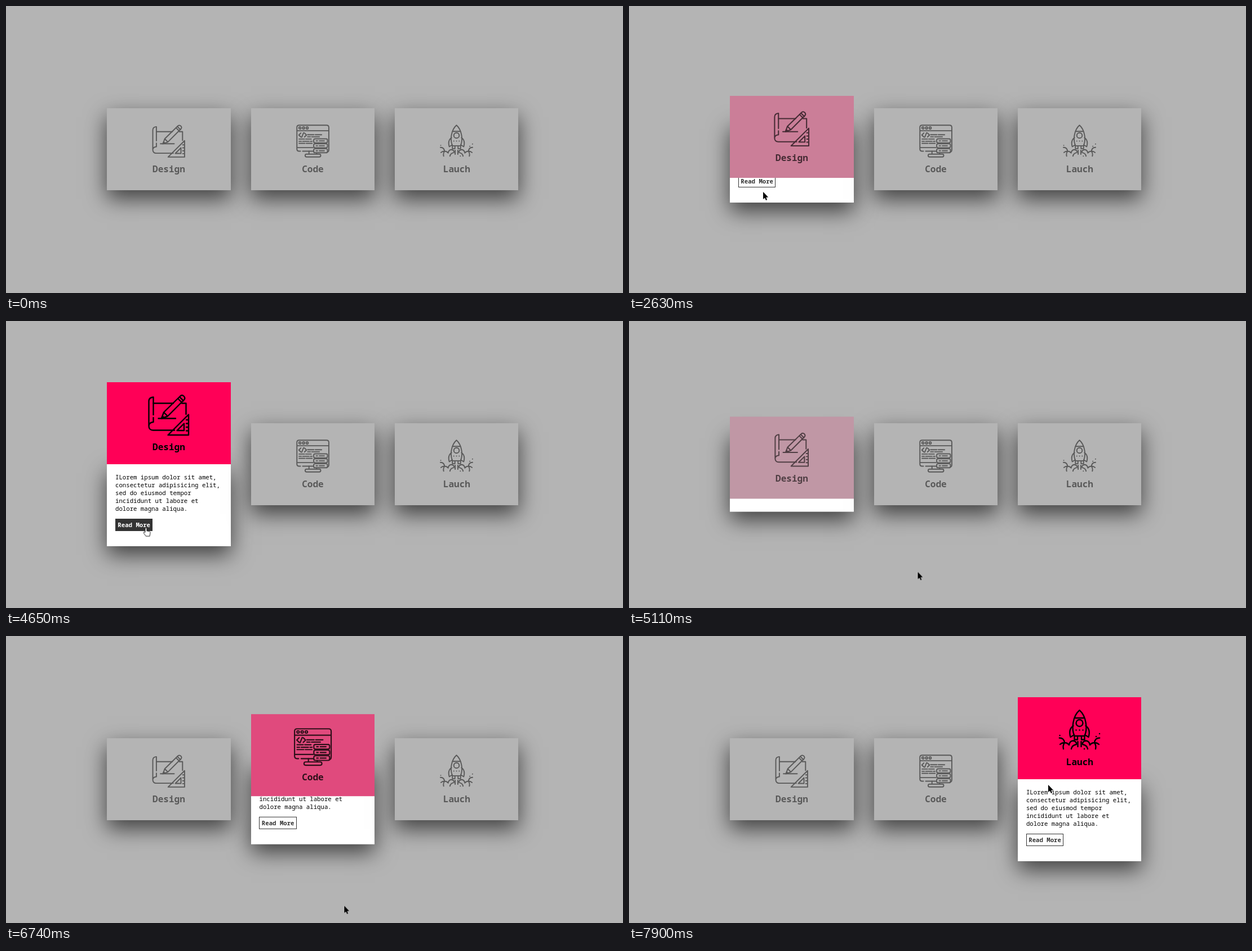
An HTML page that plays this animation: 1095x511 px, repeating every 7.99 s.

```html
<!DOCTYPE html>
<html lang="en">
<head>
<meta charset="utf-8">
<title>Hover cards</title>
<style>
/* --p: how far a card is open, --h: button highlight */
@property --p { syntax: "<number>"; inherits: true; initial-value: 0; }
@property --h { syntax: "<number>"; inherits: true; initial-value: 0; }

html, body { margin: 0; width: 100%; height: 100%; overflow: hidden; }
body {
  position: relative;
  background: #b4b4b4;
  font: 10.7px/14px "Noto Sans Mono", "DejaVu Sans Mono", monospace;
  color: #000;
}

.card { position: absolute; top: 182.3px; width: 219.2px; height: 146px; }
.design { left: 179.4px; animation: design 7990ms infinite, press 7990ms infinite; }
.code { left: 434.9px; animation: code 7990ms infinite; }
.launch { left: 690.3px; animation: launch 7990ms infinite; }

.front, .back { position: absolute; inset: 0; }
.front { z-index: 2; background: #b4b4b4; transform: translateY(calc(var(--p) * -73px)); }
.front::before { content: ""; position: absolute; inset: 0; background: #ff0057; opacity: var(--p); }
.back {
  z-index: 1;
  background: #fff;
  box-shadow: 0 14.6px 36.5px rgba(0, 0, 0, .65);
  transform: translateY(calc(var(--p) * 73px));
}
.label { position: absolute; inset: 0; opacity: calc(.5 + .5 * var(--p)); }
.label svg {
  position: absolute; left: 73px; top: 21.4px; width: 73px; height: 73px;
  overflow: visible;
  fill: none; stroke: #000; stroke-width: 2.4; stroke-linecap: round; stroke-linejoin: round;
  transform: scale(calc(.8 + .2 * var(--p)));
}
h3 {
  position: absolute; left: 0; top: 97.6px; width: 100%; margin: 0;
  font-size: 16.06px; line-height: 20px; font-weight: 700; text-align: center;
  transform: translateY(calc(var(--p) * 7.3px));
}
p { position: absolute; left: 14.6px; top: 16.2px; width: 189.8px; margin: 0; }
.more {
  --c: calc(51 + 204 * var(--h));
  position: absolute; left: 14.6px; top: 96.7px; width: 64.4px; height: 20.4px;
  border: 1px solid #333;
  line-height: 20.4px; font-weight: 700; text-align: center;
  color: rgb(var(--c), var(--c), var(--c));
  background: rgba(51, 51, 51, var(--h));
}

@keyframes design {
  0%, 31.66% { --p: 0; }
  37.92%, 60.58% { --p: 1; }
  66.83%, 100% { --p: 0; }
}
@keyframes code {
  0%, 65.58% { --p: 0; }
  71.84%, 82.79% { --p: 1; }
  89.05%, 100% { --p: 0; }
}
@keyframes launch {
  0%, 87.65% { --p: 0; }
  93.91%, 100% { --p: 1; }
}
@keyframes press {
  0%, 49.81% { --h: 0; }
  56.07%, 59.2% { --h: 1; }
  65.46%, 100% { --h: 0; }
}

.cursor {
  position: absolute; left: 0; top: 0; width: 20px; height: 20px; z-index: 3;
  overflow: visible; pointer-events: none;
  animation: travel 7990ms linear infinite;
}
.arrow { animation: arrow 7990ms step-end infinite; }
.beam { animation: beam 7990ms step-end infinite; }
.hand { animation: hand 7990ms step-end infinite; }

@keyframes arrow {
  0% { opacity: 0; }
  8.51% { opacity: 1; }
  36.92% { opacity: 0; }
  48.81% { opacity: 1; }
  49.81% { opacity: 0; }
  59.2% { opacity: 1; }
  69.84% { opacity: 0; }
  81.73%, 100% { opacity: 1; }
}
@keyframes beam {
  0% { opacity: 0; }
  36.92% { opacity: 1; }
  48.81% { opacity: 0; }
  69.84% { opacity: 1; }
  81.73%, 100% { opacity: 0; }
}
@keyframes hand {
  0% { opacity: 0; }
  49.81% { opacity: 1; }
  59.2%, 100% { opacity: 0; }
}
@keyframes travel {
  0%, 8.51% { transform: translate(1062px, 500px); }
  10.64% { transform: translate(1040px, 400px); }
  13.14% { transform: translate(985px, 240px); }
  15.64% { transform: translate(895px, 105px); }
  18.15% { transform: translate(795px, 36px); }
  19.15% { transform: translate(752px, 34px); }
  21.28% { transform: translate(610px, 55px); }
  23.15% { transform: translate(420px, 120px); }
  25.03% { transform: translate(200px, 215px); }
  26.66% { transform: translate(50px, 300px); }
  27.53% { transform: translate(21px, 345px); }
  28.91% { transform: translate(83px, 369px); }
  29.91% { transform: translate(110px, 364px); }
  31.66% { transform: translate(180px, 346px); }
  32.92% { transform: translate(238px, 331px); }
  35.04% { transform: translate(252px, 305px); }
  37.55% { transform: translate(256px, 278px); }
  39.8% { transform: translate(255px, 270px); }
  42.68% { transform: translate(254px, 281px); }
  45.06% { transform: translate(262px, 300px); }
  47.56% { transform: translate(269px, 322px); }
  49.19% { transform: translate(258px, 347px); }
  50.31%, 57.6% { transform: translate(240px, 364px); }
  59.2% { transform: translate(262px, 375px); }
  60.58% { transform: translate(320px, 401px); }
  61.95% { transform: translate(410px, 436px); }
  62.83% { transform: translate(465px, 446px); }
  63.95% { transform: translate(512px, 447px); }
  64.83% { transform: translate(535px, 430px); }
  65.58% { transform: translate(550px, 401px); }
  67.71% { transform: translate(562px, 340px); }
  70.09% { transform: translate(566px, 305px); }
  72.72%, 80.1% { transform: translate(564.5px, 299px); }
  81.73% { transform: translate(568px, 350px); }
  82.79% { transform: translate(575px, 401px); }
  84.36% { transform: translate(600px, 480px); }
  85.11% { transform: translate(625px, 495px); }
  86.11% { transform: translate(658px, 470px); }
  87.61% { transform: translate(700px, 375px); }
  88.24% { transform: translate(738px, 294px); }
  90.11% { transform: translate(741px, 275px); }
  98.87%, 100% { transform: translate(744px, 265px); }
}
</style>
</head>
<body>

<div class="card design">
  <div class="back">
    <p>ILorem ipsum dolor sit amet, consectetur adipisicing elit, sed do eiusmod tempor incididunt ut labore et dolore magna aliqua.</p>
    <span class="more">Read More</span>
  </div>
  <div class="front"><div class="label">
    <svg viewBox="0 0 73 73">
      <path d="M9.5 36V4.5C4 5 1.5 8 1.5 12V56C1.5 60.5 4.5 63.5 9 63.5H47M9.5 41V49C4.5 49.5 1.5 52 1.5 56"/>
      <path d="M9.5 15.5H45M60 15.5H67.5V35M18.5 42.5H49"/>
      <path d="M24 42.5L28 31.5 57.5 2.5Q60.8 0 63.7 3T64.3 9L35 38.5ZM53 7l7 7M56 4.2l7 7M28 31.5l7 7"/>
      <path d="M24 42.5l1.6-4.2 2.6 2.6z" fill="#000"/>
      <path d="M72 35.5V72H35.5ZM64 51.5V64H51.5ZM68 45h4M68 51.5h4M68 58h4M68 64.5h4"/>
    </svg>
    <h3>Design</h3>
  </div></div>
</div>

<div class="card code">
  <div class="back">
    <p>ILorem ipsum dolor sit amet, consectetur adipisicing elit, sed do eiusmod tempor incididunt ut labore et dolore magna aliqua.</p>
    <span class="more">Read More</span>
  </div>
  <div class="front"><div class="label">
    <svg viewBox="0 0 73 73">
      <path d="M69 61Q72 60 72 56V6Q72 1.2 67 1.2H6Q1.2 1.2 1.2 6V54Q1.2 59 6 59H9M14 59H38M1.2 51H37M1.2 13.5H72"/>
      <circle cx="8" cy="7.3" r="2.3"/><circle cx="16" cy="7.3" r="2.3"/><circle cx="24" cy="7.3" r="2.3"/>
      <path d="M10 18.5L5.5 23l4.5 4.5M16 18l-4 10M18 18.5l4.5 4.5-4.5 4.5"/>
      <path d="M25 22.5h14M42 22.5h14M25 27h6M34 27h17M6 32h12M21 32h12M6 37h5M14 37h14M31 37h4M6 41.5h13M22 41.5h13"/>
      <rect x="38.5" y="31.5" width="30.5" height="9" rx="3"/>
      <rect x="38.5" y="42.5" width="30.5" height="9" rx="3"/>
      <rect x="38.5" y="53.5" width="30.5" height="9" rx="3"/>
      <path d="M44 36h3M51 36h11M44 47h3M51 47h11M44 58h3M51 58h11"/>
      <path d="M28 59v6M45 63v2"/>
      <rect x="19.5" y="65.5" width="34.5" height="6.3" rx="3"/>
    </svg>
    <h3>Code</h3>
  </div></div>
</div>

<div class="card launch">
  <div class="back">
    <p>ILorem ipsum dolor sit amet, consectetur adipisicing elit, sed do eiusmod tempor incididunt ut labore et dolore magna aliqua.</p>
    <span class="more">Read More</span>
  </div>
  <div class="front"><div class="label">
    <svg viewBox="0 0 73 73">
      <defs>
        <path id="side" d="M25.5 29C19.5 33 17.5 39 20.5 49L27 45M27.5 47V53.5H33V47M33.5 57V66M.8 50.5Q9 50.5 10 59M2 62Q5 59 10 59T18 63M10 59Q6.5 64 8 70M18 63Q19 56 25 55.5 30 56 31 60M22 70Q23 63.5 31 62"/>
      </defs>
      <path d="M27.5 47C22 35 24 12 36.5 1.2 49 12 51 35 45.5 47ZM28 15H45"/>
      <circle cx="36.5" cy="24" r="6"/>
      <path d="M30.5 36.5h.1M36.5 36.5h.1M42.5 36.5h.1"/>
      <use href="#side"/>
      <use href="#side" transform="translate(73) scale(-1 1)"/>
      <path d="M1.5 46h.1M72 43h.1M66 48h.1M45 70h.1"/>
    </svg>
    <h3>Lauch</h3>
  </div></div>
</div>

<svg class="cursor" viewBox="0 0 20 20">
  <path class="arrow" d="M0 0V13L3 10.4 5 15 7 14.1 5.1 9.7 9 9.4Z" fill="#000" stroke="#eee" stroke-width="1" paint-order="stroke"/>
  <path class="beam" d="M-3-6H-1L0-5 1-6H3M0-5V5M-3 6H-1L0 5 1 6H3" fill="none" stroke="#222" stroke-width="1"/>
  <path class="hand" d="M-1.5 8V1Q0-1.5 1.5 1V5.5L6.5 6.5Q8 7 7.5 9.5L6.5 15H0L-4 9.5Q-4.5 7.5-3 7.3Z" fill="#fff" stroke="#000" stroke-width=".9" stroke-linejoin="round"/>
</svg>

</body>
</html>
```
